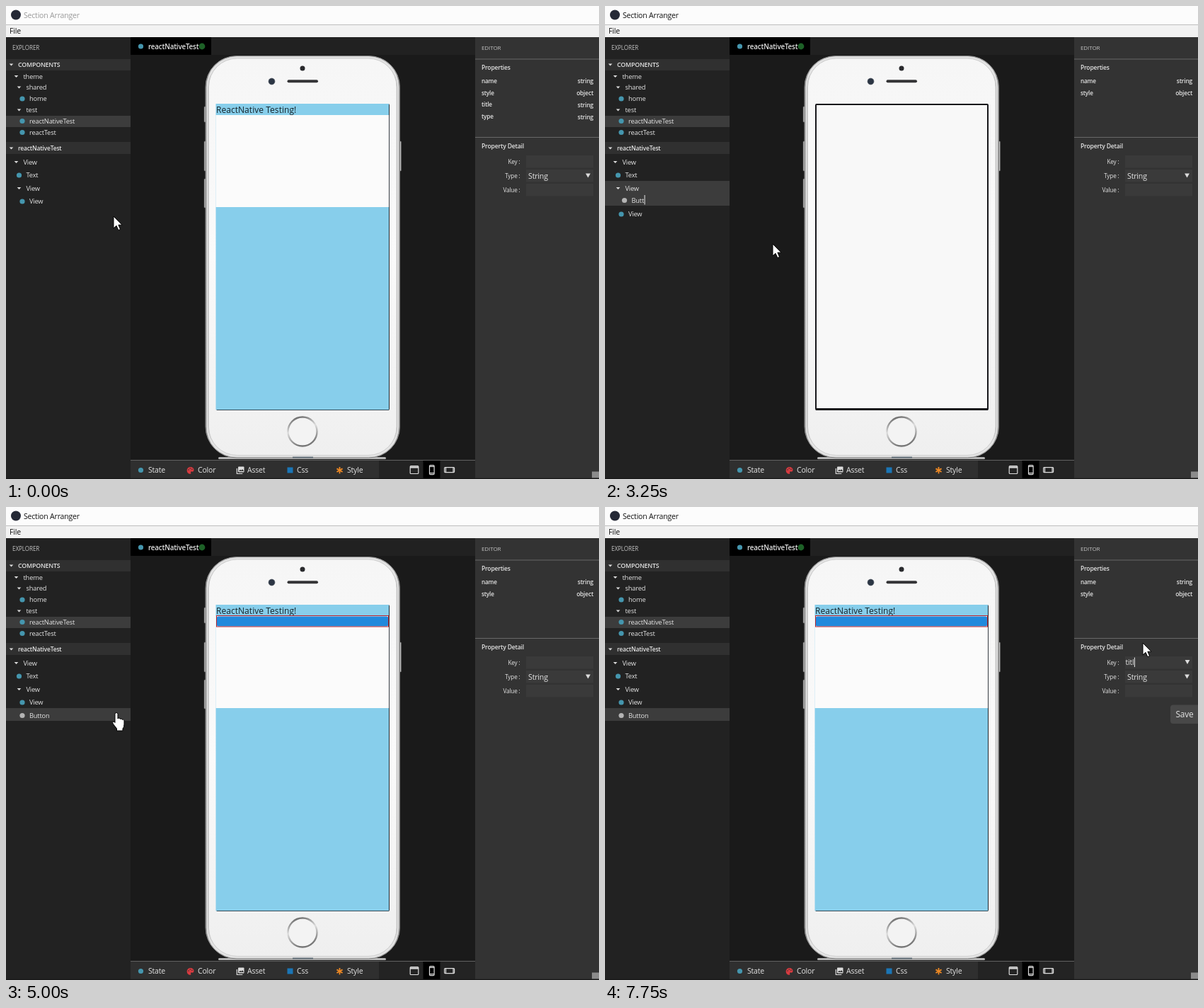
An HTML page for the animation above (8 s loop, 838x668 px).

```html
<!DOCTYPE html>
<html lang="en">
<head>
<meta charset="utf-8">
<title>Section Arranger</title>
<style>
html, body { margin: 0; width: 100%; height: 100%; overflow: hidden; background: #1a1a1a; }
svg { display: block; width: 100%; height: 100%; }
text { font-family: "Open Sans", "Noto Sans", sans-serif; letter-spacing: -.18px; fill: #e4e4e4; white-space: pre; }
.b { font-weight: 600; }
.end { text-anchor: end; }
.dark { fill: #111; }
.dim { fill: #c4c4c4; letter-spacing: -.08px; }
.app { fill: #16232a; letter-spacing: .05px; }
.off { display: none; }
</style>
</head>
<body>
<svg id="stage" viewBox="0 0 838 668"></svg>
<script>
const STEP = 250, LOOP = 8000;

// Drawing helpers; text is placed by the middle of its capitals.
const rect = (x, y, w, h, fill, more = '') =>
  `<rect x="${x}" y="${y}" width="${w}" height="${h}" fill="${fill}" ${more}/>`;
const text = (x, y, s, size = 9.3, cls = '', more = '') =>
  `<text x="${x}" y="${y + size * .36}" font-size="${size}" class="${cls}" ${more}>${s}</text>`;
const dot = (x, y, r, fill, more = '') => `<circle cx="${x}" cy="${y}" r="${r}" fill="${fill}" ${more}/>`;
const path = (d, fill, more = '') => `<path d="${d}" fill="${fill}" ${more}/>`;
const group = (id, s) => `<g id="${id}">${s}</g>`;
const tri = (x, y, w = 2.8, h = 3) => path(`M${x - w} ${y - h / 2}h${2 * w}l${-w} ${h}z`, '#ddd');
const cyan = (x, y) => dot(x, y, 3.6, '#4596ae');
const pale = (x, y) => dot(x, y, 3.6, '#b4b4b4');
const frame = (y, h, id) => rect(297.5, y, 243, h, 'none', `id="${id}" stroke="#b5222c"`);

const branch = (x, y, s) => tri(x, y) + text(x + 10, y, s);
const leaf = (x, y, s, icon = cyan) => icon(x, y) + text(x + 10, y, s);

function titleBar() {
  return rect(0, 0, 838, 26.5, '#fcfcfc') + rect(0, 26.5, 838, 17.5, '#f2f2f2') +
    dot(14, 12.5, 7, '#252936') +
    text(25, 13, 'Section Arranger', 10.5, 'dark', 'id="title"') +
    text(5, 35, 'File', 10.5, 'dark');
}

function explorer() {
  return rect(0, 44, 176, 624, '#222') + text(9, 59, 'EXPLORER', 8.1, 'dim') +
    rect(0, 75, 176, 16, '#303030') + tri(7.5, 83) + text(17, 83, 'COMPONENTS', 8.8, 'b') +
    branch(14.5, 99.5, 'theme') + branch(18.5, 115, 'shared') + leaf(23, 131, 'home') +
    branch(18.5, 147, 'test') +
    rect(0, 155, 176, 16, '#3c3c3c') + leaf(23, 162.5, 'reactNativeTest') +
    leaf(23, 178.5, 'reactTest') +
    rect(0, 192, 176, 17, '#303030') + tri(7.5, 201) + text(17, 201, 'reactNativeTest', 8.5, 'b') +
    branch(14.5, 220.5, 'View') + leaf(18.5, 239, 'Text') +
    rect(0, 247, 176, 18, '#3c3c3c', 'id="viewRow"') +
    group('entry', rect(0, 247, 176, 35, '#3c3c3c') + pale(27.5, 274.5) +
      text(37.5, 274.5, '', 9.3, '', 'id="entryText"') +
      rect(38, 267, 1, 13.5, '#e8e8e8', 'id="entryCaret"')) +
    branch(18.5, 257.5, 'View') +
    group('child', leaf(23, 276, 'View')) +
    group('button', rect(0, 284, 176, 18, '#424242', 'id="buttonRow"') + leaf(23, 294.5, 'Button', pale));
}

function phone() {
  const side = (x, y, h) => rect(x, y, 3, h, '#bdbdbd', 'rx="1" stroke="#555" stroke-width=".6"');
  return side(280, 142, 22) + side(280, 191, 42) + side(280, 244, 41) + side(555.5, 191, 42) +
    rect(300, 637, 237, 3, '#b4b4b4', 'rx="1.5"') +
    rect(282, 70.5, 274.5, 567.5, 'url(#metal)', 'rx="44" stroke="#858585"') +
    rect(284.5, 73, 269.5, 562.5, 'none', 'rx="41.5" stroke="#e9e9e9" stroke-width="1.6"') +
    rect(286.5, 74, 265.5, 560.5, 'url(#face)', 'rx="40" stroke="#cfcfcf"') +
    rect(405, 636.5, 29, 2, '#66737c') +
    dot(419, 88, 3.5, '#292a2d') + dot(375.5, 106.5, 4.5, '#2c3644', 'stroke="#555b66" stroke-width=".6"') +
    rect(397.5, 104.3, 43.5, 4, '#343436', 'rx="2"') +
    dot(419, 601, 20.5, '#f3f3f3', 'stroke="url(#ring)" stroke-width="2.4"') +
    rect(298, 139, 243, 431, '#f8f8f8', 'stroke="#16161a" stroke-width="2" rx="1"') +
    rect(298, 568, 243, 3, '#16161a') +
    group('app', rect(296.5, 138, 244.6, 432.3, '#87ceeb') +
      rect(296.5, 154, 244.6, 130, '#fbfbfb', 'id="panel"') +
      text(297, 146.5, 'ReactNative Testing!', 12, 'app') +
      rect(297.5, 154.5, 243, 14, '#2089dc', 'rx="3" id="appButton"') +
      frame(153.5, 130, 'viewFrame') + frame(153.5, 15.5, 'buttonFrame'));
}

function center() {
  const icon = 'fill="none" stroke="#ddd" stroke-width="1.2"';
  let star = '';
  for (let a = 0; a < 180; a += 60)
    star += rect(470.6, 651, 1.8, 9.4, '#f08a24', `transform="rotate(${a} 471.5 655.7)"`);
  return rect(176, 44, 487, 624, '#1a1a1a') + rect(176, 44, 487, 25, '#212121') +
    rect(176, 44, 114, 25, '#000') + cyan(190.5, 57) +
    text(201, 57, 'reactNativeTest', 9.8, 'b') + dot(277, 57, 4.4, '#1d6127') +
    phone() +
    rect(176, 641, 487, 27, '#232323') + rect(176, 642, 351, 26, '#2f2f2f') +
    rect(176, 641, 487, 1, '#616161') +
    cyan(190.5, 655.5) + text(201, 655.5, 'State', 10.5) +
    path('M260.5 651c3 0 5 1.8 5 4.2 0 2-1.5 2.6-3 2.4-1.6-.2-1.8.8-1.2 1.8.5.9-.2 1.4-1 1.4-2.6 0-4.6-2.2-4.6-4.9s2.1-4.9 4.8-4.9z', '#d63b40') +
    dot(258, 655, .8, '#2f2f2f') + dot(260.3, 653, .8, '#2f2f2f') + dot(262.9, 654.3, .8, '#2f2f2f') +
    text(271, 655.5, 'Color', 10.5) +
    path('M326.3 653v7.5h8', 'none', 'stroke="#ddd" stroke-width="1.2"') +
    rect(328, 650.5, 8.5, 8, '#ddd', 'rx="1"') + path('M329 657l2-2.6 1.5 1.5 1.5-2 2 3.1z', '#333') +
    text(341, 655.5, 'Asset', 10.5) +
    rect(397.5, 651.5, 8, 8, '#1b76b6') + text(411, 655.5, 'Css', 10.5) +
    star + text(482, 655.5, 'Style', 10.5) +
    rect(589.5, 642, 24, 26, '#000') +
    `<g ${icon}><rect x="571.2" y="649.7" width="11.6" height="10.8" rx="1"/><path d="M571 651.5h12" stroke-width="2.2"/>
     <rect x="598.5" y="648.6" width="6.6" height="13" rx="1.2"/><path d="M598.5 650.3h6.6M598.5 659.7h6.6"/>
     <rect x="619.6" y="651.6" width="14" height="7" rx="1"/><path d="M621.5 652v6M632 652v6"/></g>`;
}

function editor() {
  const row = (y, name, type) => text(672, y, name, 8.2, 'b') + text(830, y, type, 8.4, 'b end');
  const field = (y, name) => text(726.5, y, name, 8.2, 'end') + rect(735, y - 9, 95, 17.5, '#3a3a3a');
  return rect(663, 44, 175, 624, '#333') + text(672, 59, 'EDITOR', 8, 'dim') +
    rect(663, 74.5, 175, 1, '#686868') + text(672, 87, 'Properties', 8.5, 'b') +
    row(106, 'name', 'string') + row(123, 'style', 'object') +
    group('moreProps', row(139.5, 'title', 'string') + row(156.5, 'type', 'string')) +
    rect(663, 185, 175, 1, '#686868') + text(672, 197.5, 'Property Detail', 8.6, 'b') +
    field(220, 'Key :') + field(240, 'Type :') + field(260, 'Value :') +
    text(738, 240, 'String', 10.6) + tri(822.5, 239.5, 3.4, 6) +
    group('keyFocus', text(735.5, 219.5, '', 10.4, '', 'id="keyText"') +
      rect(736, 212.5, 1, 13.5, '#eee', 'id="keyCaret"') + tri(823, 219, 3.4, 6)) +
    group('save', rect(799, 279.5, 46, 26.5, '#484848', 'rx="4"') + text(806.5, 293, 'Save', 11.9)) +
    rect(828, 657.5, 10, 9, '#8b8b8b') + rect(0, 666.7, 838, 1.3, '#191919');
}

function menu() {
  const items = ['Add HTML', 'Add Reactstrap', 'Add React Icons', 'Add React Native', 'Add RN Elements', 'Delete'];
  return group('menu', rect(144, 255, 117, 116, '#000', 'opacity=".55"') +
    rect(142.5, 253, 115.5, 115, '#222', 'stroke="#111" stroke-width=".8"') +
    rect(143, 310, 114.5, 17.5, '#464646', 'id="menuHover"') +
    items.map((s, i) => text(152, 266.5 + i * 17.6, s, 9.4)).join(''));
}

const pointer = 'stroke="#000" stroke-width="1" stroke-linejoin="round"';
document.getElementById('stage').innerHTML = `<defs>
  <linearGradient id="metal"><stop offset="0" stop-color="#9c9c9c"/><stop offset=".03" stop-color="#d4d4d4"/>
    <stop offset=".97" stop-color="#d4d4d4"/><stop offset="1" stop-color="#9c9c9c"/></linearGradient>
  <linearGradient id="face" x2="0" y2="1"><stop offset="0" stop-color="#f6f6f6"/>
    <stop offset=".5" stop-color="#fafafa"/><stop offset="1" stop-color="#efefef"/></linearGradient>
  <linearGradient id="ring" x2=".3" y2="1"><stop offset="0" stop-color="#555"/>
    <stop offset=".5" stop-color="#ddd"/><stop offset="1" stop-color="#777"/></linearGradient></defs>` +
  titleBar() + explorer() + center() + editor() + menu() +
  path('M0 0V17L4 13.3L6.8 19.6L9.6 18.4L6.9 12.2H12Z', '#fff', `id="arrow" ${pointer}`) +
  path('M3.5 14V2.5a2 2 0 0 1 4 0V9a1.8 1.8 0 0 1 3.4.6 1.8 1.8 0 0 1 3 .8 1.7 1.7 0 0 1 2.6 1.4V17q0 4-2 6v3H6v-3L1 16.5Q-.8 13.5 1.2 13 2.5 13 3.5 14.5Z',
    '#fff', `id="hand" ${pointer}`);

const el = {};
document.querySelectorAll('svg [id]').forEach(e => el[e.id] = e);
const show = (id, on) => el[id].classList.toggle('off', !on);

// [step, pointer, x, y]
const moves = [
  [0, 'arrow', 152, 297], [1, 'arrow', 150, 288], [2, 'hand', 140, 262], [3, 'hand', 139, 253],
  [4, 'hand', 165, 270], [5, 'hand', 221, 318], [6, 'arrow', 226, 325], [7, 'arrow', 237, 335],
  [12, 'arrow', 237, 336], [18, 'arrow', 200, 318], [19, 'hand', 156, 290], [21, 'arrow', 693, 136],
  [22, 'arrow', 690, 142], [23, 'arrow', 708, 170], [24, 'arrow', 748, 206], [25, 'arrow', 760, 216],
  [26, 'arrow', 761, 205], [27, 'arrow', 760, 192]
];

function typed(name, word, count) {
  const s = word.slice(0, Math.max(0, count));
  el[name + 'Text'].textContent = s;
  const w = s ? el[name + 'Text'].getComputedTextLength() : 0;
  el[name + 'Caret'].setAttribute('transform', `translate(${w} 0)`);
}

function draw(n) {
  const between = (a, b) => n >= a && n < b;
  const added = n >= 14, picked = n >= 20;

  el.title.style.fill = n ? '#111' : '#999';
  show('moreProps', n < 3);
  show('viewRow', between(2, 20));
  show('menu', between(4, 6));
  show('menuHover', n === 5);

  show('entry', between(6, 14));
  typed('entry', 'Button', n - 9);
  show('entryCaret', n !== 9);
  el.child.setAttribute('transform', `translate(0 ${between(6, 14) ? 18 : 0})`);
  show('button', added);
  show('buttonRow', n >= 19);
  el.buttonRow.setAttribute('fill', n === 19 ? '#454545' : '#3c3c3c');

  show('app', !between(12, 18));
  el.panel.setAttribute('fill', between(3, 20) ? '#fff' : '#fbfbfb');
  show('viewFrame', between(3, 20));
  show('appButton', added);
  show('buttonFrame', picked);

  show('keyFocus', n >= 25);
  typed('key', 'title', n - 27);
  show('save', n >= 26);

  const [, kind, x, y] = moves.filter(m => m[0] <= n).pop();
  show('arrow', kind === 'arrow');
  show('hand', kind === 'hand');
  el[kind].setAttribute('transform', `translate(${kind === 'hand' ? x - 5.5 : x} ${y})`);
}

const start = performance.now();
let last = -1;
function tick(now) {
  const n = Math.floor((Math.max(0, now - start) % LOOP) / STEP);
  if (n !== last) draw(last = n);
  requestAnimationFrame(tick);
}
draw(0);
requestAnimationFrame(tick);
</script>
</body>
</html>
```
